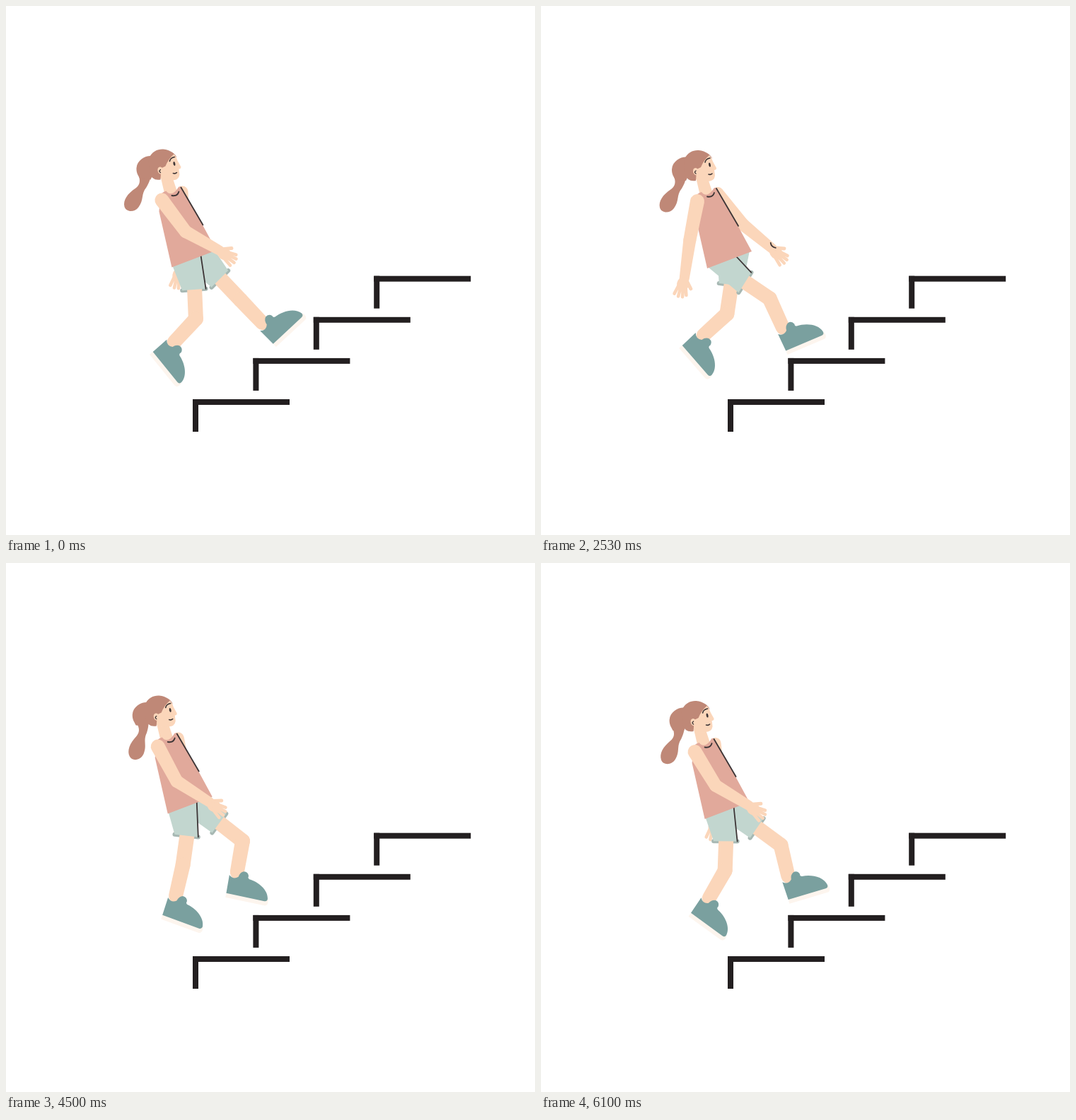
Animation, 748 px wide and 748 px high, one loop 6.13 s. Source, as an HTML page with a canvas:

```html
<!DOCTYPE html>
<html>
<head>
<meta charset="utf-8">
<title>Climbing the stairs</title>
<style>
  html, body { margin: 0; height: 100%; overflow: hidden; background: #fff; }
  canvas { display: block; }
</style>
</head>
<body>
<canvas id="stage" width="748" height="748"></canvas>
<script>
const ctx = document.getElementById('stage').getContext('2d');
const SKIN = '#fbd6ba', SHIRT = '#e1a99b', HAIR = '#bf8877', SHORTS = '#c2d6cf',
      HEM = '#a7b8b3', SHOE = '#7aa09f', SOLE = '#fdf5ee', INK = '#3d3536', STAIR = '#231f20';
const LOOP = 6130, STRIDE = 22;

// Keyed poses of one stride; limb angles in degrees, 0 = down, positive = forward.
const KEYS = [0, 3, 5, 8, 10, 12, 14, 15, 18, 20, 21];
const bodyTrack = [-1.5, 0, -8, -15, -8, 1.5, 0, -4.5, -16, -16.5, -9];
const tailTrack = [19, 10, 4, 19, 40, 45, 19, 7, -1, 6, 13.5];
const nearLeg = {
  thigh: [2.5, -5, 14, 75, 66, 51, 56, 45.6, 13, -8, -2],
  shin: [-43, -48, -46, -7, 14, 36, 24.5, 25, 12, -13, -30],
  foot: [51, 50, 45, 10, -16, -36, -23, -22, -8, 20, 36]
};
const farLeg = {
  thigh: [43.5, 52, 38, 6.3, -4, -1, -8.5, 0, 45, 52, 53.7],
  shin: [43.5, 25, 20, 6.3, -30, -45, -47.6, -47.7, -22, -10, 13.4],
  foot: [-43, -23, -18, -5, 36, 53, 49, 50.7, 25, 12, -16.6]
};
const nearArm = {
  upper: [37, 38, 24, -4.5, -17, -19, -11, -3.6, 17, 28.5, 31.6],
  fore: [61, 60, 50, 24, 2, -10, -8, -2, 35, 57.5, 59]
};
const farArm = {
  upper: [2, 0, 12, 37.3, 46, 46, 38, 36, 18, 10, 5],
  fore: [-6, -8, 12, 58.5, 62, 60, 50.5, 41, 15, -2, -5]
};

// Smooth periodic curve through the keys
function sample(track, phase) {
  const n = KEYS.length;
  const time = i => KEYS[(i + n) % n] + STRIDE * Math.floor(i / n);
  const value = i => track[(i + n) % n];
  let i = n - 1;
  while (KEYS[i] > phase) i--;
  const span = time(i + 1) - time(i), u = (phase - time(i)) / span;
  const slope = k => (value(k + 1) - value(k - 1)) / (time(k + 1) - time(k - 1)) * span;
  const a = value(i), b = value(i + 1);
  return a + u * u * (3 - 2 * u) * (b - a)
    + u * (1 - u) * ((1 - u) * slope(i) - u * slope(i + 1));
}

const rad = deg => deg * Math.PI / 180;
const along = (p, deg, length) =>
  [p[0] + length * Math.sin(rad(deg)), p[1] + length * Math.cos(rad(deg))];

function fill(color, path) {
  ctx.fillStyle = color;
  ctx.fill(new Path2D(path));
}
function line(color, width, path) {
  ctx.strokeStyle = color;
  ctx.lineWidth = width;
  ctx.stroke(new Path2D(path));
}
function at([x, y], deg, draw) {
  ctx.save();
  ctx.translate(x, y);
  ctx.rotate(rad(deg));
  draw();
  ctx.restore();
}

// Tapered limb with round ends
function limb(a, b, r1, r2) {
  const dir = Math.atan2(b[1] - a[1], b[0] - a[0]), q = Math.PI / 2;
  ctx.beginPath();
  ctx.arc(...a, r1, dir + q, dir - q);
  ctx.arc(...b, r2, dir - q, dir + q);
  ctx.fillStyle = SKIN;
  ctx.fill();
}

function shoe() {
  fill(SOLE, 'M-9 25L51 24Q53 33 47 33H-9Z');
  fill(SHOE, 'M-10 1Q-3 7 3 1Q4 -6 9 -8Q15 -9 17 -3Q16 0 19 1C32 2 48 10 50 23Q50 27 46 27H-9Z');
}

function drawLeg(leg, phase, hip, waist, outlined) {
  const thigh = sample(leg.thigh, phase), shin = sample(leg.shin, phase);
  const knee = along(hip, thigh, 69), ankle = along(knee, shin, 50);
  const back = along(along(hip, thigh, 28), thigh + 90, -17.5);
  const front = along(along(hip, thigh, 27), thigh + 90, 16);
  line(HEM, 6, `M${back}L${front}`);
  limb(hip, knee, 10.5, 10.5);
  limb(knee, along(ankle, shin, -5), 10.5, 10);
  at(ankle, sample(leg.foot, phase), shoe);
  fill(SHORTS, `M${waist[0]}L${back}L${front}L${waist[1]}Z`);
  if (outlined) line(INK, 1.8, `M${waist[1]}L${front}`);
}

function hand() {
  ctx.beginPath();
  ctx.ellipse(-1, 8, 8.5, 10, 0, 0, 7);
  ctx.fillStyle = SKIN;
  ctx.fill();
  line(SKIN, 4.6, 'M-6 9L-11 23M-3 10L-5 26M0 10L1 26M3 9L6 23');
  line(SKIN, 5, 'M4 3L11 13');
}

function drawArm(arm, phase, shoulder, bracelet) {
  const upper = sample(arm.upper, phase), fore = sample(arm.fore, phase);
  const elbow = along(shoulder, upper, 56), wrist = along(elbow, fore, 55);
  limb(shoulder, elbow, bracelet ? 8 : 10, 9);
  limb(elbow, wrist, 9, 7);
  at(wrist, -fore, () => {
    hand();
    if (bracelet) line(INK, 1.8, 'M5 -7Q1 -3 4 3');
  });
}

function drawHead(tail) {
  at([197, 230], tail - 19, () => {
    ctx.translate(-197, -230);
    fill(HAIR, 'M187 238C192 250 189 255 184 259C172 267 166 276 168 285C170 293 182 294 188 286C196 275 191 268 199 258C204 250 205 244 206 238Z');
  });
  fill(HAIR, 'M208 214C200 212 186 218 185 231C185 238 187 240 190 246L205 247L213 230Z');
  fill(SKIN, 'M218 238L225 268L234 271L242 262L237 247Z');
  fill(SKIN, 'M217 235L232 209Q240 209 243 220L248 229Q248 232 245 232L246 240Q245 248 235 248Q226 249 219 245Z');
  fill(HAIR, 'M202 218C207 206 216 203.500 223 204C233 205 241 211 242 216L238 211Q230 218 226 228L220 231L219 247Q207 249 204 238Z');
  fill(SKIN, 'M222 231C217 226 213 232 216 237Q219 241 222 238Z');
  line(INK, 1.4, 'M219 233Q216 235 219 237');
  line(INK, 1.6, 'M232 221Q233 216 239 215M237 238Q240 239 242 237');
  ctx.beginPath();
  ctx.ellipse(238.5, 224.5, 1.4, 3, -0.2, 0, 7);
  ctx.fillStyle = INK;
  ctx.fill();
}

function drawTorso() {
  fill(SHIRT, 'M219 270Q220 265 227 263Q235 273 245 257L248 257L279 312L298 347L235 371L217 292Z');
  line(INK, 1.8, 'M235 269.500Q243 271 245 264');
  line(INK, 1.8, 'M248 258L279 311');
}

function drawStairs() {
  ctx.fillStyle = STAIR;
  for (let i = 0; i < 4; i++) {
    const x = 264 + 85.4 * i, y = 556 - 58.1 * i;
    ctx.fillRect(x, y, 137, 8);
    ctx.fillRect(x, y, 8, 46);
  }
}

function drawWalker(phase) {
  const dy = sample(bodyTrack, phase);
  const farHip = [275 + 0.22 * sample(farLeg.thigh, phase), 367];
  ctx.save();
  ctx.translate(0.38 * dy, dy);
  drawArm(farArm, phase, [250, 264], true);
  drawLeg(farLeg, phase, farHip, [[250, 364], [295, 346]]);
  drawLeg(nearLeg, phase, [266, 375], [[236, 369], [276, 354]], true);
  drawHead(sample(tailTrack, phase));
  drawTorso();
  drawArm(nearArm, phase, [221, 276]);
  ctx.restore();
}

// Ten poses every 700 ms, the first one held for 100 ms
function poseIndex(ms) {
  const rest = ms % 700;
  const step = rest < 100 ? 0 : 1 + Math.floor((rest - 96) / (200 / 3));
  return Math.floor(ms / 700) * 10 + step;
}

function render() {
  ctx.fillStyle = '#fff';
  ctx.fillRect(0, 0, 748, 748);
  ctx.lineCap = 'round';
  drawStairs();
  drawWalker(poseIndex(performance.now() % LOOP) % STRIDE);
  requestAnimationFrame(render);
}
render();
</script>
</body>
</html>
```
